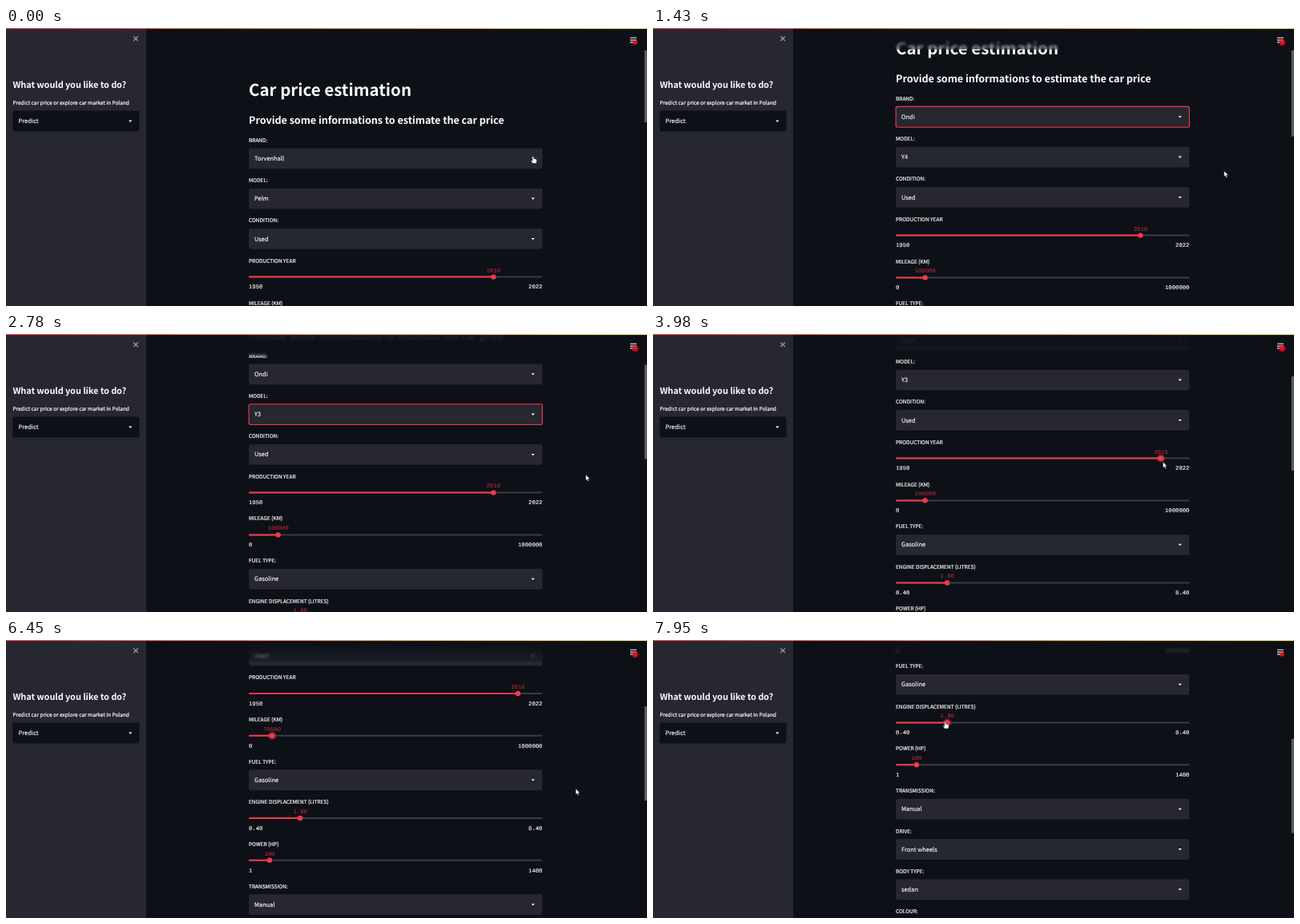
Recreate the animation shown at these times as an HTML page. Size 800 px wide and 348 px high, loop 8 s.

```html
<!DOCTYPE html>
<html lang="en">
<head>
<meta charset="utf-8">
<title>Car price estimation</title>
<style>
  html, body { margin: 0; width: 800px; height: 348px; overflow: hidden; background: #0d1017; }
  svg, #veil { position: absolute; left: 0; top: 0; }
  svg { display: block; }
  #veil {
    left: 175px; width: 625px; height: 27px;
    background: linear-gradient(rgba(13,16,23,.96), rgba(13,16,23,.86) 45%, rgba(13,16,23,.35));
    backdrop-filter: blur(1.6px);
  }
  text {
    font-family: "Noto Sans CJK JP", "Noto Sans CJK SC", "Noto Sans CJK", "Open Sans", sans-serif;
    font-size: 7.46px; fill: #fafafa; stroke: #fafafa; stroke-width: .14px;
    text-rendering: geometricPrecision; white-space: pre;
  }
  .label { font-size: 6.53px; stroke-width: .2px; }
  .mono { font-family: "Liberation Mono", monospace; font-size: 7.29px; }
  .title, .sub, .side { font-weight: 700; stroke: none; }
  .title { font-size: 20.5px; }
  .sub { font-size: 12.7px; letter-spacing: -.08px; }
  .side { font-size: 10.95px; letter-spacing: -.08px; }
  .red { fill: #f5384a; stroke: none; opacity: .8; }
  .dim { fill: #8a8c93; stroke: none; }
</style>
</head>
<body>
<svg id="main" width="800" height="348" viewBox="0 0 800 348"><g id="page"></g></svg>
<div id="veil"></div>
<svg id="top" width="800" height="348" viewBox="0 0 800 348">
  <defs>
    <linearGradient id="bar"><stop stop-color="#ff4b4b"/><stop offset="1" stop-color="#fffd80"/></linearGradient>
    <radialGradient id="glow"><stop offset=".35" stop-color="#f20d1c"/><stop offset="1" stop-color="#f20d1c" stop-opacity="0"/></radialGradient>
  </defs>
</svg>
<script>
const LOOP = 8000, STEP = 75, NOTCH = 52;
const LEFT = 303, WIDTH = 366.5, ROW = 20.8;
const RED = '#f5384a', PANEL = '#262730', DARK = '#0d1017';
const page = document.getElementById('page'), overlay = document.getElementById('top');

function add(parent, tag, attrs, content) {
  const el = document.createElementNS('http://www.w3.org/2000/svg', tag);
  set(el, attrs);
  if (content !== undefined) el.textContent = content;
  parent.appendChild(el);
  return el;
}
function set(el, attrs) {
  for (const k in attrs) el.setAttribute(k, attrs[k]);
}
const show = (el, on) => set(el, { visibility: on ? 'visible' : 'hidden' });
const write = (el, s) => { if (el.textContent !== s) el.textContent = s; };
const label = (parent, x, y, s, cls = '', anchor = 'start') =>
  add(parent, 'text', { x, y, class: cls, 'text-anchor': anchor }, s);
const caret = (parent, x, y) =>
  add(parent, 'path', { d: `M${x - 2.2} ${y - 1}h4.4l-2.2 2.3z`, fill: '#fafafa' });

// Form fields, stacked from top to bottom
let rowY = 140;
function select(name, value) {
  const y = rowY;
  rowY += 50.3;
  label(page, LEFT, y + 2.8, name, 'label');
  const box = add(page, 'rect', { x: LEFT + .1, y: y + 10.4, width: WIDTH - .2, height: 25.8, rx: 2.2, fill: PANEL, 'stroke-width': 1.1 });
  const text = label(page, 310, y + 25.9, value);
  caret(page, 657.7, y + 23.3);
  return { y, box, text };
}
function slider(name, min, max, value, digits = 0) {
  const y = rowY, mid = y + 20.7;
  rowY += 52.8;
  label(page, LEFT, y + 2.8, name, 'label');
  label(page, LEFT, y + 35.5, min.toFixed(digits), 'mono');
  label(page, LEFT + WIDTH, y + 35.5, max.toFixed(digits), 'mono', 'end');
  add(page, 'rect', { x: LEFT, y: mid - 1, width: WIDTH, height: 2, rx: 1, fill: '#3a3c45' });
  const fill = add(page, 'rect', { x: LEFT, y: mid - 1, height: 2, rx: 1, fill: RED });
  const halo = add(page, 'circle', { cy: mid, r: 5, fill: RED, opacity: .45 });
  const knob = add(page, 'circle', { cy: mid, r: 3.2, fill: RED });
  const tip = label(page, 0, y + 14.6, '', 'mono red', 'middle');
  const at = v => LEFT + WIDTH * (v - min) / (max - min);
  function update(v, hot) {
    const x = at(v);
    set(fill, { width: x - LEFT });
    for (const el of [halo, knob]) set(el, { cx: x });
    set(tip, { x });
    write(tip, v.toFixed(digits));
    show(halo, hot);
  }
  update(value, false);
  return { mid, at, update };
}
function menu(field, items) {
  const g = add(page, 'g', {}), first = field.y + 44;
  add(g, 'rect', { x: LEFT, y: first - 6, width: WIDTH, height: 158, rx: 2.2, fill: DARK, stroke: PANEL, 'stroke-width': .6 });
  const hover = add(g, 'rect', { x: LEFT, width: WIDTH, height: ROW, fill: PANEL });
  items.forEach((s, i) => label(g, 311, first + 13.2 + i * ROW, s));
  const rowAt = i => first + (i + .5) * ROW;
  function update(open, pointerY) {
    show(g, open);
    const i = Math.floor((pointerY - first) / ROW);
    set(hover, { y: first + Math.max(0, Math.min(items.length - 1, i)) * ROW });
  }
  return { rowAt, update };
}

label(page, LEFT, 84.5, 'Car price estimation', 'title');
label(page, LEFT, 119.8, 'Provide some informations to estimate the car price', 'sub');
const brand = select('BRAND:', 'Torvenhall');
const model = select('MODEL:', 'Pelm');
select('CONDITION:', 'Used');
const year = slider('PRODUCTION YEAR', 1950, 2022, 2010);
const mileage = slider('MILEAGE (KM)', 0, 1000000, 100000);
select('FUEL TYPE:', 'Gasoline');
const engine = slider('ENGINE DISPLACEMENT (LITRES)', .4, 8.4, 1.8, 2);
slider('POWER (HP)', 1, 1400, 100);
select('TRANSMISSION:', 'Manual');
select('DRIVE:', 'Front wheels');
select('BODY TYPE:', 'sedan');
select('COLOUR:', 'black');
const brandMenu = menu(brand, ['Torvenhall', 'Prellin', 'Ondi', 'Kastrova', 'Melvard', 'Tesmora', 'Vindelo']);
const modelMenu = menu(model, Array.from({ length: 7 }, (_, i) => 'Y' + (i + 1)));

// Sidebar, header and pointer
add(overlay, 'rect', { width: 175, height: 348, fill: PANEL });
add(overlay, 'path', { d: 'M159.2 10.4l5.6 5.6m0-5.6l-5.6 5.6', stroke: '#92939a', 'stroke-width': 1.4 });
label(overlay, 8.4, 75, 'What would you like to do?', 'side');
label(overlay, 8.4, 96.2, 'Predict car price or explore car market in Poland', 'label');
add(overlay, 'rect', { x: 8.4, y: 103.5, width: 158, height: 26, rx: 2.2, fill: DARK });
label(overlay, 15.6, 119.3, 'Predict');
caret(overlay, 155.2, 116.6);
const thumb = add(overlay, 'rect', { x: 796.8, width: 3.2, fill: '#5c5e65' });
add(overlay, 'rect', { width: 800, height: 1.1, fill: 'url(#bar)' });

const running = add(overlay, 'g', {});
const wave = 'q1.4-1.3 2.8 0t2.8 0 2.8 0 2.8 0';
add(running, 'path', {
  d: `M690 16${wave}M690 18.6${wave}M692.4 14.4l3-2-2.2-2 2.6-.9 3.6 4.6`,
  fill: 'none', stroke: '#7d7f86', 'stroke-width': 1
});
add(running, 'circle', { cx: 699.4, cy: 11.4, r: 1.3, fill: '#7d7f86' });
label(running, 706, 17.2, 'RUNNING...', 'label dim');
label(running, 751, 17, 'Stop', 'label');

add(overlay, 'path', { d: 'M779 12.3h8m-8 2.8h8m-8 2.8h8', stroke: '#fafafa', 'stroke-width': 1.1 });
const dot = add(overlay, 'circle', { cx: 785.2, cy: 18.2, fill: 'url(#glow)' });

const pointer = add(overlay, 'g', { fill: '#fff', stroke: '#111', 'stroke-width': .5, 'stroke-linejoin': 'round' });
const arrow = add(pointer, 'path', { d: 'M0 0V7.4L1.7 5.9 2.9 8.6 4.2 8 3 5.4H5.3Z' });
const hand = add(pointer, 'path', {
  d: 'M-.8 .6Q0-.5 .8 .6V3.2Q1.6 2.7 2.2 3.4 3 3 3.5 3.8 4.6 3.6 4.6 4.8V6.6Q4.4 7.8 3.7 9H-.4L-2.6 5.9Q-2.6 4.8-1.5 5.2L-.8 5.9Z'
});

// Motion: eased progress between two times
function glide(t, from, to) {
  const p = Math.min(1, Math.max(0, (t - from) / (to - from)));
  return p < .5 ? 2 * p * p : 1 - 2 * (1 - p) ** 2;
}
const during = (t, from, to) => t >= from && t < to;

const scrollAt = t => NOTCH * (glide(t, 1125, 1350)
  + 2 * (glide(t, 2625, 2900) + glide(t, 6250, 6525) + glide(t, 7050, 7325)));
const yearAt = t => Math.round(2010 + 5 * glide(t, 3600, 3900) + glide(t, 4050, 4200));
const kmAt = t => 500 * Math.round(200 - 41 * glide(t, 4875, 5400));

function pointerAt(t) {
  let x = 657.8, y = 160.5;
  const move = (from, to, tx, ty) => {
    const p = glide(t, from, to);
    x += (tx - x) * p;
    y += (ty - y) * p;
  };
  const s = scrollAt(t);
  move(300, 675, 345, brandMenu.rowAt(2));
  move(900, 1275, 712.7, 178.8);
  move(1575, 1950, 650, 160);
  move(2025, 2250, 345, modelMenu.rowAt(2) - s);
  move(2400, 2700, 723.5, 176);
  move(3000, 3450, year.at(yearAt(t)) + 2.5, year.mid - s + 4.5);
  move(4350, 4800, mileage.at(kmAt(t)), mileage.mid - s - 1.5);
  move(5850, 6225, 711, 186);
  move(7050, 7425, 480, 107);
  move(7425, 7800, engine.at(1.8) - 2.6, engine.mid - s - 1.5);
  return [x, y];
}

function draw(ms) {
  const t = Math.floor((ms % LOOP) / STEP) * STEP;
  const s = scrollAt(t), [x, y] = pointerAt(t);

  set(page, { transform: `translate(0 ${-s})` });
  const barTop = Math.max(28, s * .34);
  set(thumb, { y: barTop, height: s * .34 + 118 - barTop });

  write(brand.text, t < 825 ? 'Torvenhall' : 'Ondi');
  write(model.text, t < 1200 ? 'Pelm' : t < 2325 ? 'Y4' : 'Y3');
  set(brand.box, { stroke: during(t, 225, 2025) ? RED : 'none' });
  set(model.box, { stroke: during(t, 2025, 3525) ? RED : 'none' });
  brandMenu.update(during(t, 225, 825), y + s);
  modelMenu.update(during(t, 2025, 2325), y + s);

  year.update(yearAt(t), during(t, 3450, 4800));
  mileage.update(kmAt(t), during(t, 4800, 7800));
  engine.update(1.8, t >= 7800);

  // The app reruns shortly after each input
  show(running, [900, 2325, 4350, 5550].some(from => during(t, from, from + 375)));
  set(dot, { r: 4.3 + 1.1 * Math.cos((t / 1200 - .27) * 2 * Math.PI) });

  const onLink = t < 975 || during(t, 1875, 2475) || during(t, 4725, 5925) || t >= 7725;
  set(pointer, { transform: `translate(${x} ${y})` });
  show(hand, onLink);
  show(arrow, !onLink);
}

const start = performance.now();
function loop() {
  draw(performance.now() - start);
  requestAnimationFrame(loop);
}
loop();
</script>
</body>
</html>
```
